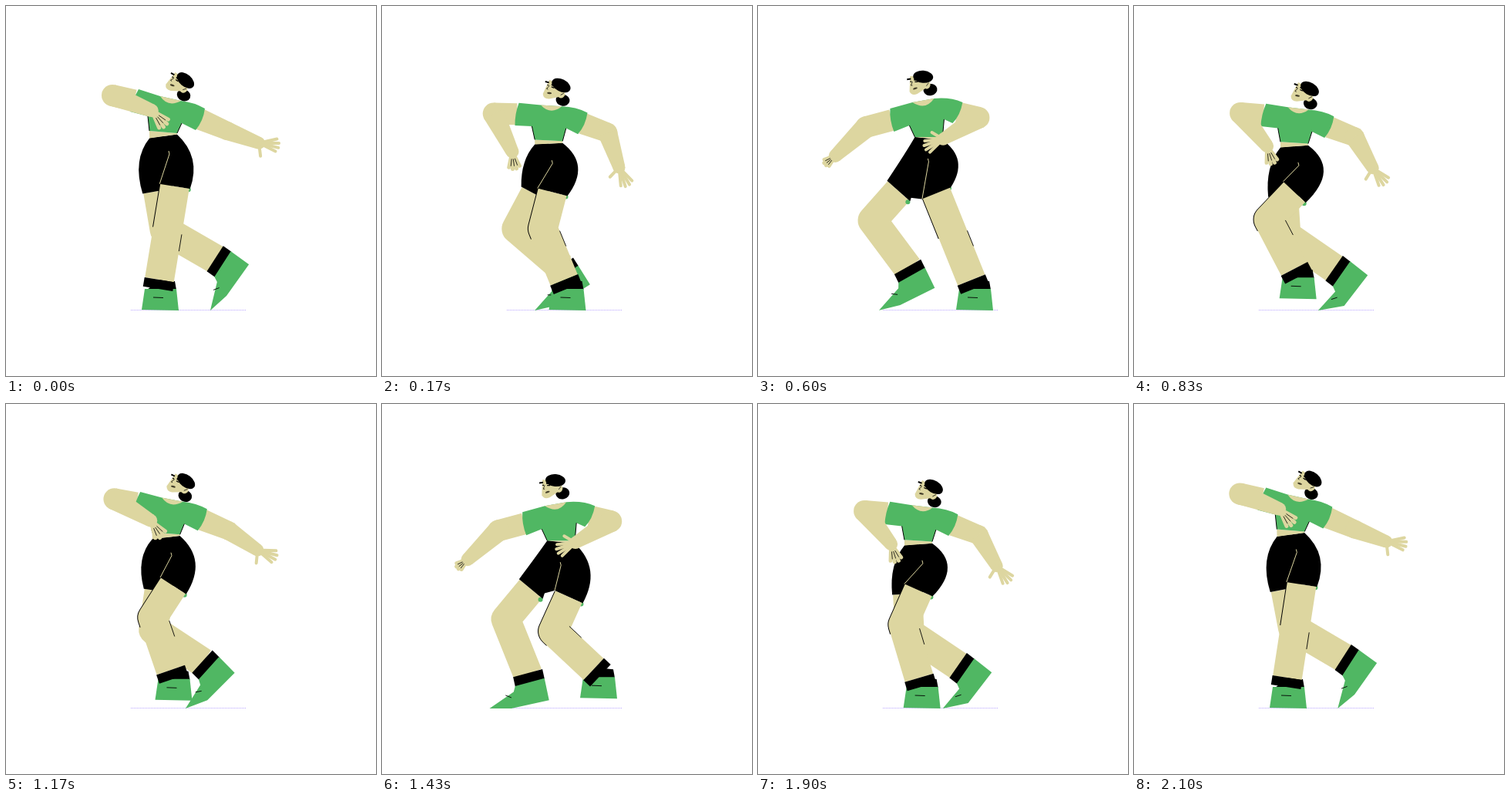
Animation, 480 px wide and 480 px high, one loop 2130 ms. Source, as an HTML page with a canvas:

```html
<!DOCTYPE html>
<html lang="en">
<head>
<meta charset="utf-8">
<title>Dancer</title>
<style>
html, body { margin: 0; width: 100%; height: 100%; overflow: hidden; background: #fff; }
canvas { display: block; }
</style>
</head>
<body>
<canvas id="stage" width="480" height="480"></canvas>
<script>
const ctx = document.getElementById('stage').getContext('2d');
const SKIN = '#ddd6a0', GREEN = '#50b763', BLACK = '#000';
const LOOP = 2130, STEPS = 64, BAR = 32, FLOOR = 395;

const rad = d => d * Math.PI / 180;
const polar = ([x, y], deg, r) => [x + r * Math.cos(rad(deg)), y + r * Math.sin(rad(deg))];
const lerp = (a, b, u) => a + (b - a) * u;
const between = (a, b, u) => [lerp(a[0], b[0], u), lerp(a[1], b[1], u)];
const shift = (p, n, r) => [p[0] + n[0] * r, p[1] + n[1] * r];

function ease(from, to, t) {
  const u = Math.min(1, Math.max(0, (t - from) / (to - from)));
  return u * u * (3 - 2 * u);
}
// Eases from 0 to 1 over a..b and back over c..d.
const pulse = (t, a, b, c, d) => ease(a, b, t) - ease(c, d, t);

// Unit normal of a->b, pointing to the right side for a downward limb.
function normal(a, b) {
  const dx = b[0] - a[0], dy = b[1] - a[1], d = Math.hypot(dx, dy) || 1;
  return [dy / d, -dx / d];
}

// Knee of a two-part leg that bends to the left.
function findKnee(hem, ankle, thigh, shin) {
  const d = Math.hypot(ankle[0] - hem[0], ankle[1] - hem[1]);
  const along = Math.min(thigh, (thigh ** 2 - shin ** 2 + d * d) / (2 * d));
  const bend = Math.sqrt(thigh ** 2 - along ** 2);
  return shift(between(hem, ankle, along / d), normal(hem, ankle), -bend);
}

function poly(color, ...pts) {
  ctx.fillStyle = color;
  ctx.beginPath();
  pts.forEach(p => ctx.lineTo(...p));
  ctx.fill();
}
function line(color, width, ...pts) {
  ctx.strokeStyle = color;
  ctx.lineWidth = width;
  ctx.beginPath();
  pts.forEach(p => ctx.lineTo(...p));
  ctx.stroke();
}
function oval(color, x, y, rx, ry = rx, rot = 0) {
  ctx.fillStyle = color;
  ctx.beginPath();
  ctx.ellipse(x, y, rx, ry, rot, 0, 7);
  ctx.fill();
}
function taper(a, b, ra, rb) {
  const n = normal(a, b);
  poly(SKIN, shift(a, n, ra), shift(b, n, rb), shift(b, n, -rb), shift(a, n, -ra));
}
function forearm(elbow, wrist, ra, rb) {
  oval(SKIN, ...elbow, ra);
  taper(elbow, wrist, ra, rb);
  oval(SKIN, ...wrist, rb);
}
function fingers(wrist, angle, gap, length, width) {
  ctx.lineCap = 'round';
  for (let i = 0; i < 4; i++) {
    const off = i - 1.5;
    line(SKIN, width, wrist, polar(wrist, angle + off * gap, length - 2 * Math.abs(off)));
  }
  ctx.lineCap = 'butt';
}

function drawHead([x, y], angle) {
  ctx.save();
  ctx.translate(x, y);
  ctx.rotate(rad(angle));
  oval(BLACK, 19, 7, 9, 7.5, -.2);
  ctx.fillStyle = SKIN;
  ctx.beginPath();
  ctx.moveTo(-7, -11);
  ctx.lineTo(-8, 9);
  ctx.quadraticCurveTo(-5, 15, 2, 12);
  ctx.lineTo(13, 5);
  ctx.lineTo(14, -10);
  ctx.fill();
  oval(SKIN, 15, 1, 4, 5, .4);
  line(BLACK, .7, [14, 2], [17, -2]);
  oval(BLACK, 10, -10, 13, 8, .1);
  line(BLACK, 2, [-11, -7], [-6, -7.5]);
  line(BLACK, 2, [-2, -6.5], [3, -6]);
  line(BLACK, 1.3, [-7, -4], [-5, -4]);
  line(BLACK, 1.3, [-1, -3.5], [3, -3.5]);
  line(BLACK, .7, [-4, -4], [-6, 1], [-4, 1]);
  oval('#443f2a', -.5, 5, 3, 1.2, -.3);
  ctx.restore();
}

function drawShoeP(toe, tilt) {
  const spot = (x, y) => polar(polar(toe, tilt, x), tilt + 90, y);
  // The tip bends forward where it would sink into the floor.
  const sunk = Math.max(0, toe[1] - FLOOR), tip = [toe[0] - sunk, toe[1] - sunk];
  poly(BLACK, spot(36, -36), spot(75, -41), spot(76, -28), spot(37, -23));
  poly(GREEN, tip, spot(34, -17), spot(37, -24), spot(76, -29), spot(78, 0), spot(28, 4));
  line(BLACK, .9, spot(23, -14), spot(30, -10));
}

function drawLegQ(hem, knee, band, [x, y]) {
  const n = normal(knee, band), along = [-n[1], n[0]];
  const ankle = shift(band, along, -6), end = shift(band, along, 6);
  const left = p => [p[0] - 1, p[1]];
  poly(BLACK, [x - 17, y - 27], [x + 21, y - 27], [x + 19, y - 38], [x, y - 40]);
  poly(GREEN, [x - 20, y - 28], [x + 21, y - 28], [x + 24, y], [x - 24, y - 1]);
  line(BLACK, .9, [x - 9, y - 17], [x + 4, y - 16.5]);
  line(BLACK, 38, ...[hem, knee, between(knee, ankle, .1)].map(left));
  line(SKIN, 38, hem, knee, ankle);
  line(BLACK, .9, ...[.15, .45].map(u => shift(between(knee, ankle, u), n, 19)));
  line(BLACK, 39, ankle, end);
}

function draw(f) {
  const b = f % BAR;
  const turn = pulse(b, 1.5, 10, 20, 27.5);
  const step = pulse(b, 0, 10, 19, 27);
  const air = pulse(f, 20, 24, 43, 47);
  const bob = Math.sin(Math.PI * b / 16) ** 2;
  const crouch = bob * (1 - turn);
  const mix = (open, folded) => lerp(open, folded, turn);

  const neckX = 214 + 12 * turn * bob + 3.5 * Math.sin(2 * Math.PI * b / BAR);
  const neckY = 120 + 13.3 * bob;
  // A body point: offset from the neck in the open pose and in the folded one.
  const at = (ax, ay, bx, by) => [neckX + mix(ax, bx), neckY + mix(ay, by)];

  // Feet: P slides back after each step, Q stays flat.
  const slide = Math.max(0, b - 10);
  const tilt = lerp(-50, -6 - 2 * slide, step);
  const toe = [lerp(265, 137 + 2.5 * slide, step),
    FLOOR + 20 * crouch * (1 - step) - 6 * bob * bob * step * (1 - air)];
  const footQ = [lerp(200, 281, step), FLOOR - air * (8 + 7 * bob)];

  const hemP = [neckX + mix(-17, -32) + 2 * crouch, 240 + 9 * crouch];
  const ankleP = polar(polar(toe, tilt, 55.5), tilt - 90, 37);
  const kneeP = findKnee(hemP, ankleP, 51, 77);
  const hemQ = shift(at(5, 114, 17, 121), [-19, -10], crouch);
  const band = [footQ[0] - 2, footQ[1] - 34];
  const kneeQ = findKnee(hemQ, band, 49, 78);

  ctx.fillStyle = '#fff';
  ctx.fillRect(0, 0, 480, 480);
  ctx.lineJoin = 'round';
  ctx.setLineDash([1, 1]);
  line('#b9a5ff', 1, [162, 394.5], [312, 394.5]);
  ctx.setLineDash([]);

  // Far leg
  line(SKIN, 38, hemP, kneeP, ankleP);
  drawShoeP(toe, tilt);

  // Shorts
  const waist = at(-10, 49, 7, 50), slant = mix(-8, 6);
  const waistL = polar(waist, slant, -18), waistR = polar(waist, slant, 18);
  const nP = normal(hemP, kneeP), nQ = normal(hemQ, kneeQ);
  const outP = shift(hemP, nP, -20), inP = shift(hemP, nP, 20);
  const inQ = shift(hemQ, nQ, -20), outQ = shift(hemQ, nQ, 20);
  const midP = between(waistL, outP, .5), midQ = between(waistR, outQ, .5);
  oval(GREEN, inP[0] - 3, inP[1] + 1, 3);
  oval(GREEN, outQ[0] - 2, outQ[1] + 1, 3);
  ctx.fillStyle = BLACK;
  ctx.beginPath();
  ctx.moveTo(...waistL);
  ctx.quadraticCurveTo(midP[0] + mix(-18, 5), midP[1] + mix(-8, -6), ...outP);
  ctx.lineTo(...inP);
  ctx.lineTo(...waist);
  ctx.fill();
  ctx.beginPath();
  ctx.moveTo(...waistL);
  ctx.lineTo(...between(hemP, inP, .6));
  ctx.lineTo(...inQ);
  ctx.lineTo(...outQ);
  ctx.quadraticCurveTo(midQ[0] + 58 - outQ[0] + waist[0], midQ[1] - 6, ...waistR);
  ctx.fill();

  drawLegQ(hemQ, kneeQ, band, footQ);
  const fold = shift(waist, [mix(8, 0), mix(23, 30)], 1);
  line(SKIN, 1, [fold[0] - 1, fold[1] - 4], fold, inQ);

  // Upper arms and shirt
  const topL = at(-42, -12, -43, 11), cuffL = at(-53, 17, -38, 41);
  const pitL = at(-30, 23, -18, 33), hemL = at(-28, 42, -11, 48);
  const hemR = at(8, 45, 25, 48), pitR = at(14, 32, 27, 25);
  const cuffR = at(32, 41, 38, 30), topR = at(44, 13, 51, 3);
  const collarL = at(-14, -3, -14, 3), collarR = at(13, 3, 14, -2);
  const elbowL = at(-76, -4, -74, 35), elbowR = at(73, 42, 72, 23);
  const thick = mix(12, 14);

  poly(SKIN, hemL, hemR, waistR, waistL);
  taper(between(topL, cuffL, .5), elbowL, 14, 14);
  taper(between(topR, cuffR, .5), elbowR, 14, thick);

  ctx.fillStyle = GREEN;
  ctx.beginPath();
  ctx.moveTo(...topL);
  ctx.lineTo(...collarL);
  ctx.lineTo(...collarR);
  ctx.quadraticCurveTo(...at(30, 5, 35, -4), ...topR);
  ctx.quadraticCurveTo(...at(42, 29, 48, 20), ...cuffR);
  for (const p of [pitR, hemR, hemL, pitL, cuffL]) ctx.lineTo(...p);
  ctx.quadraticCurveTo(...at(-50, 2, -44, 26), ...topL);
  ctx.fill();
  line(BLACK, 1, pitL, hemL);
  line(BLACK, 1, pitR, hemR);
  ctx.fillStyle = SKIN;
  ctx.beginPath();
  ctx.moveTo(...collarL);
  ctx.quadraticCurveTo(...at(-4, 12, 3, 14), ...collarR);
  ctx.fill();

  drawHead(at(5, -21, -10, -20), mix(35, -1));

  // Forearms and hands
  const foreL = mix(21, 137), wristL = polar(elbowL, foreL, 55);
  const handL = foreL + mix(27, 4), reach = mix(27, 18);
  forearm(elbowL, wristL, 14, 8.5);
  fingers(wristL, handL, 13, reach, 5);
  for (const a of [-13, 0, 13]) {
    line(BLACK, .8, ...[.4, .8].map(u => polar(wristL, handL + a, reach * u)));
  }

  const foreR = mix(21, 149) + 8 * crouch, wristR = polar(elbowR, foreR, mix(44, 54));
  forearm(elbowR, wristR, thick, 8);
  fingers(wristR, foreR + mix(-14, 6), 13, 27, 4);
  ctx.lineCap = 'round';
  line(SKIN, 4, wristR, polar(wristR, foreR + 62, 17));
  ctx.lineCap = 'butt';
}

const start = performance.now();
function tick() {
  const t = (performance.now() - start) % LOOP;
  draw(Math.floor((t + 4) * STEPS / LOOP) % STEPS);
  requestAnimationFrame(tick);
}
tick();
</script>
</body>
</html>
```
